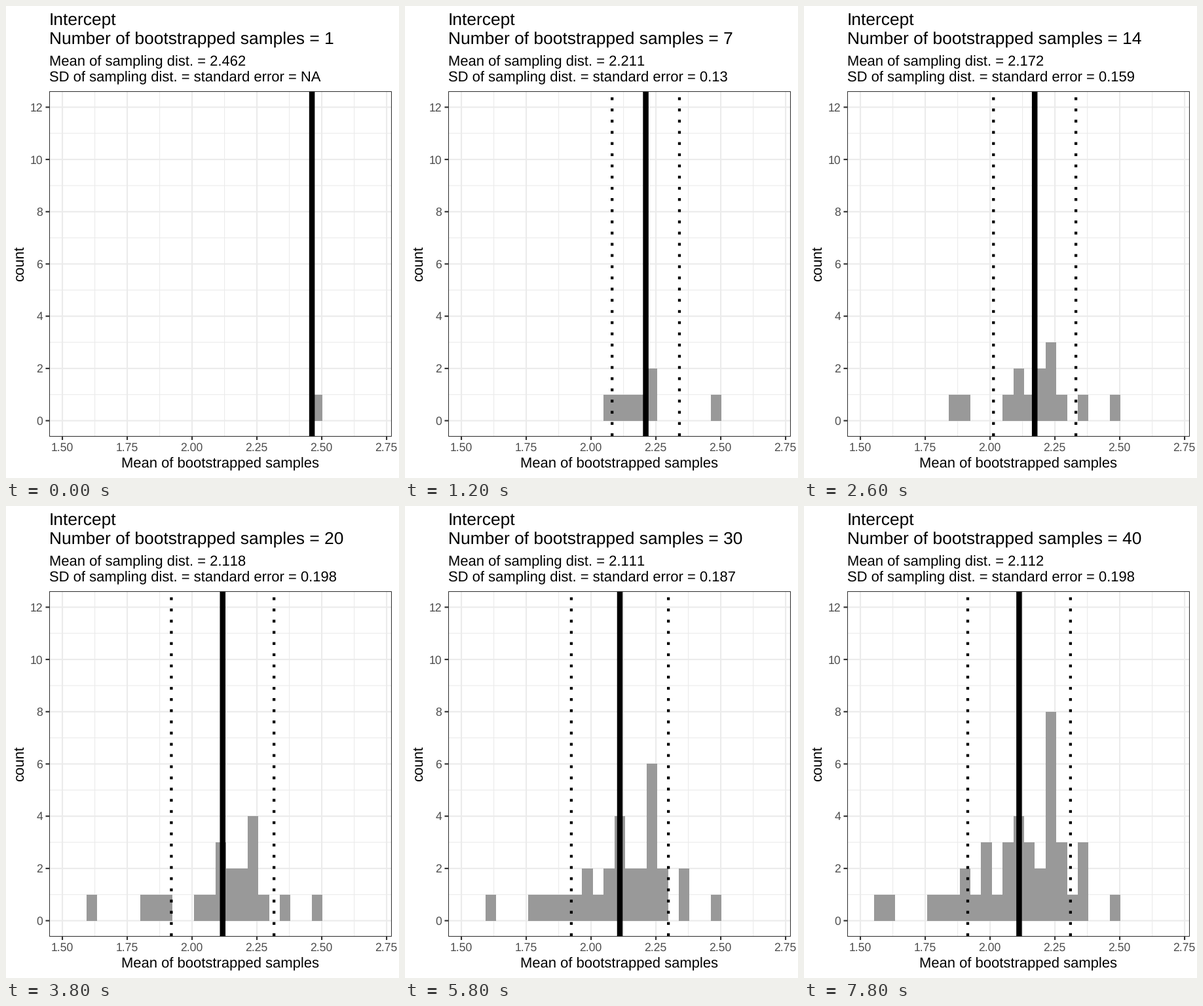
Write a matplotlib script that moves like this. It is 600x720 px and loops after 8000 ms.

```python
import matplotlib.pyplot as plt
import numpy as np
from matplotlib.animation import FuncAnimation
from matplotlib.patches import Rectangle

W, H, DPI = 600, 720, 72
LEFT, RIGHT, TOP, BOTTOM = 66, 589, 130, 657
BASE = 22
LINE = 2.13
GRID, DARK, LABEL, BAR = "#ebebeb", "#333333", "#4d4d4d", "#999999"

# One bootstrapped mean is added per step.
SAMPLES = np.array([
    2.4622, 2.200, 2.106, 2.244, 2.152, 2.066, 2.246, 2.352, 1.906, 2.194,
    2.272, 2.112, 2.233, 1.863, 2.110, 1.819, 2.237, 1.606, 2.028, 2.152,
    2.104, 1.942, 2.226, 1.981, 2.062, 2.277, 1.795, 2.239, 2.343, 2.001,
    2.239, 2.317, 1.909, 2.162, 1.995, 2.359, 2.240, 2.279, 1.572, 2.078,
])
BINS = 23
EDGES = (37.5 + np.arange(BINS + 1)) * 1.2 / 29

plt.rcParams["font.family"] = "Liberation Sans"
plt.rcParams["text.hinting"] = "none"
plt.rcParams["text.kerning_factor"] = 12  # effectively no kerning

fig = plt.figure(figsize=(W / DPI, H / DPI), dpi=DPI, facecolor="white")
ax = fig.add_axes([0, 0, 1, 1])
ax.set_xlim(0, W)
ax.set_ylim(H, 0)
ax.axis("off")


def px(x):
    return 86.07 + 396 * (x - 1.5)


def py(count):
    return 632.58 - 39.85 * count


def line(xs, ys, color, width, z, **kw):
    return ax.plot(xs, ys, color=color, lw=width, zorder=z, snap=False,
                   solid_capstyle="butt", dash_capstyle="butt", **kw)[0]


def text(x, y, s, size=BASE, color="black", **kw):
    return ax.text(x, y, s, fontsize=size, color=color, va="baseline", **kw)


def draw_axes():
    for k in range(5):
        x = px(1.625 + k / 4)
        line([x, x], [TOP, BOTTOM], GRID, LINE / 2, 1)
    for c in range(1, 12, 2):
        line([LEFT, RIGHT], [py(c)] * 2, GRID, LINE / 2, 1)
    for k in range(6):
        v = 1.5 + k / 4
        x = px(v)
        line([x, x], [TOP, BOTTOM], GRID, LINE, 2)
        line([x, x], [BOTTOM, BOTTOM + 5], DARK, LINE, 2)
        text(x - 0.5, 679, f"{v:.2f}", 0.8 * BASE, LABEL, ha="center")
    for c in range(0, 13, 2):
        y = py(c)
        line([LEFT, RIGHT], [y, y], GRID, LINE, 2)
        line([LEFT - 5.5, LEFT], [y, y], DARK, LINE, 2)
        text(56, y + 6.3, str(c), 0.8 * BASE, LABEL, ha="right")
    ax.add_patch(Rectangle((LEFT + 0.5, TOP + 0.5), RIGHT - LEFT - 1,
                           BOTTOM - TOP - 1, fill=False, ec=DARK,
                           lw=LINE / 2, snap=False, zorder=6))
    text(326.7, 704.4, "Mean of bootstrapped samples", ha="center")
    text(27, (TOP + BOTTOM) / 2, "count", rotation=90, ha="center",
         rotation_mode="anchor")
    text(LEFT, 30, "Intercept", 1.2 * BASE)


draw_axes()
title = text(LEFT, 58.6, "", 1.2 * BASE)
mean_text = text(LEFT, 91.1, "")
sd_text = text(LEFT, 115, "")

bars = []
lefts = np.floor(px(EDGES) + 0.5)
for a, b in zip(lefts[:-1], lefts[1:]):
    bars.append(ax.add_patch(Rectangle((a, 633), b - a, 0, fc=BAR, lw=0, zorder=3)))

span = [BOTTOM - 1, TOP]
mean_line = line([0, 0], span, "black", 8.54, 5)
sd_lines = [line([0, 0], span, "black", 4.27, 4, ls=(0, (1, 3))) for _ in range(2)]


def update(i):
    seen = SAMPLES[:i + 1]
    mean = seen.mean()
    sd = seen.std(ddof=1) if i else None

    for bar, count in zip(bars, np.histogram(seen, EDGES)[0]):
        y = round(py(count))
        bar.set_y(y)
        bar.set_height(633 - y)
        bar.set_visible(count > 0)

    mean_line.set_xdata([px(mean)] * 2)
    for side, ln in zip((-1, 1), sd_lines):
        ln.set_visible(i > 0)
        ln.set_xdata([px(mean + side * (sd or 0))] * 2)

    sd_label = f"{round(sd, 3):g}" if i else "NA"
    title.set_text(f"Number of bootstrapped samples = {i + 1}")
    mean_text.set_text(f"Mean of sampling dist. = {round(mean, 3):g}")
    sd_text.set_text(f"SD of sampling dist. = standard error = {sd_label}")
    return [*bars, mean_line, *sd_lines, title, mean_text, sd_text]


anim = FuncAnimation(fig, update, frames=len(SAMPLES), interval=200,
                     init_func=lambda: update(0), repeat=True, repeat_delay=0)
plt.show()
```
